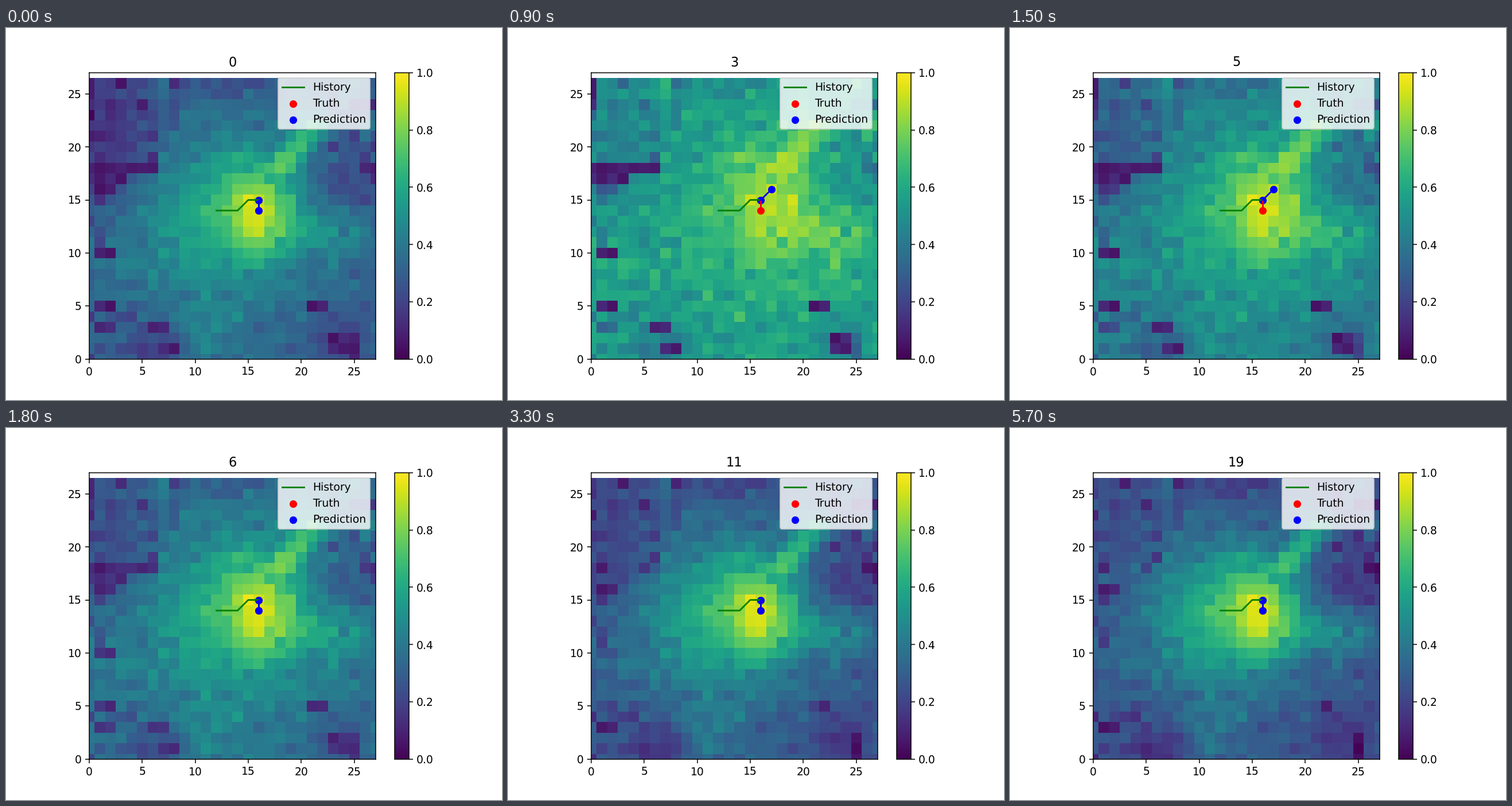
A matplotlib script for the animation above (6000 ms loop, 864 px wide and 648 px high).

```python
import numpy as np
import matplotlib.pyplot as plt
from matplotlib.animation import FuncAnimation

plt.rcParams["text.hinting"] = "none"

COLS, ROWS = 28, 27
STEPS, STEP_MS = 20, 300
X, Y = np.meshgrid(np.arange(COLS), np.arange(ROWS))
rng = np.random.default_rng(12)
noise = rng.normal(0, 0.035, X.shape)
gloom = rng.uniform(0.04, 0.13, X.shape)
chance = rng.random(X.shape)


def bump(cx, cy, rx, ry):
    return np.exp(-0.5 * (((X - cx) / rx) ** 2 + ((Y - cy) / ry) ** 2))


def streak(x0, y0, dx, dy, width):
    t = np.clip(((X - x0) * dx + (Y - y0) * dy) / (dx ** 2 + dy ** 2), 0, 1)
    dist = np.hypot(X - x0 - t * dx, Y - y0 - t * dy)
    return np.exp(-0.5 * (dist / width) ** 2)


def block(col, row, width, height=1):
    return ((X >= col) & (X < col + width) & (Y >= row) & (Y < row + height))


branch = streak(18, 18, 3.3, 4, 0.85)
corner = bump(1, 21, 4.5, 5)
arm = bump(23, 12, 4, 1.5)
foot = bump(11, 2, 2, 2)
gaps = (bump(24.5, 17, 2.5, 2) + bump(13, 26, 2.5, 1)
        + bump(6, 1, 3, 1.8) + bump(24, 2, 2, 1.8))
walls = (block(0, 17, 4, 2) | block(4, 18, 3) | block(0, 24, 1, 3)
         | block(1, 10, 2) | block(1, 5, 2) | block(21, 5, 2)
         | block(6, 3, 2) | block(7, 1, 2) | block(23, 1, 2, 2))


def smooth(up, end):
    """Heat level for the warm-up share and the settled share (0 to 1)."""
    hill = bump(12 + 6 * up, 13.5, 6.2 - end, 6 - 0.8 * end)
    peak = bump(16 + 0.6 * up, 14 + 0.8 * up, 2.2, 2.7)
    level = 0.31 + 0.25 * up - 0.05 * end
    level += (0.28 - 0.14 * up + 0.09 * end) * hill
    level += np.maximum((0.42 - 0.19 * up) * peak, (0.33 - 0.12 * up) * branch)
    level += (0.12 - 0.04 * up + 0.05 * end) * arm
    level += 0.12 * (1 - up) * foot - 0.12 * gaps
    return level - (0.20 - 0.08 * up - 0.16 * end) * corner


specks = (chance < 0.1) & (smooth(0, 0) < 0.34)


def field(i):
    up = np.interp(i, [0, 2, 3, 5, 7], [0, 0.6, 1, 0.5, 0])
    end = np.interp(i, [5, 7, 9, 10, 15], [0, 0.4, 0.6, 0.6, 1])
    level = smooth(up, end) + (1 + 0.4 * up) * noise - 0.14 * specks
    shade = (1 - end) * walls
    level += shade * (gloom - level)
    return np.clip(level, 0, 1), up


fig, ax = plt.subplots(figsize=(6.4, 4.8), dpi=135)
grid = ax.imshow(field(0)[0], origin="lower", vmin=0, vmax=1, cmap="viridis")
fig.colorbar(grid)
ax.set_xlim(0, 27)
ax.set_ylim(0, 27)

ax.plot([12, 14, 15, 16], [14, 14, 15, 15], color="green", label="History")
ax.plot([16, 16], [15, 14], color="red")
ax.scatter([16, 16], [15, 14], color="red", label="Truth")
guess_line, = ax.plot([], [], color="blue")
guess_dots = ax.scatter([16, 16], [15, 14], color="blue", label="Prediction")
ax.legend(loc="upper right")
title = ax.set_title("0")


def update(i):
    data, up = field(i)
    grid.set_data(data)
    goal = (17, 16) if up > 0.4 else (16, 14)
    path = np.array([(16, 15), goal])
    guess_line.set_data(path[:, 0], path[:, 1])
    guess_dots.set_offsets(path)
    title.set_text(str(i))
    return grid, guess_line, guess_dots, title


anim = FuncAnimation(fig, update, frames=STEPS, interval=STEP_MS,
                     repeat=True, repeat_delay=0, blit=False)
plt.show()
```
